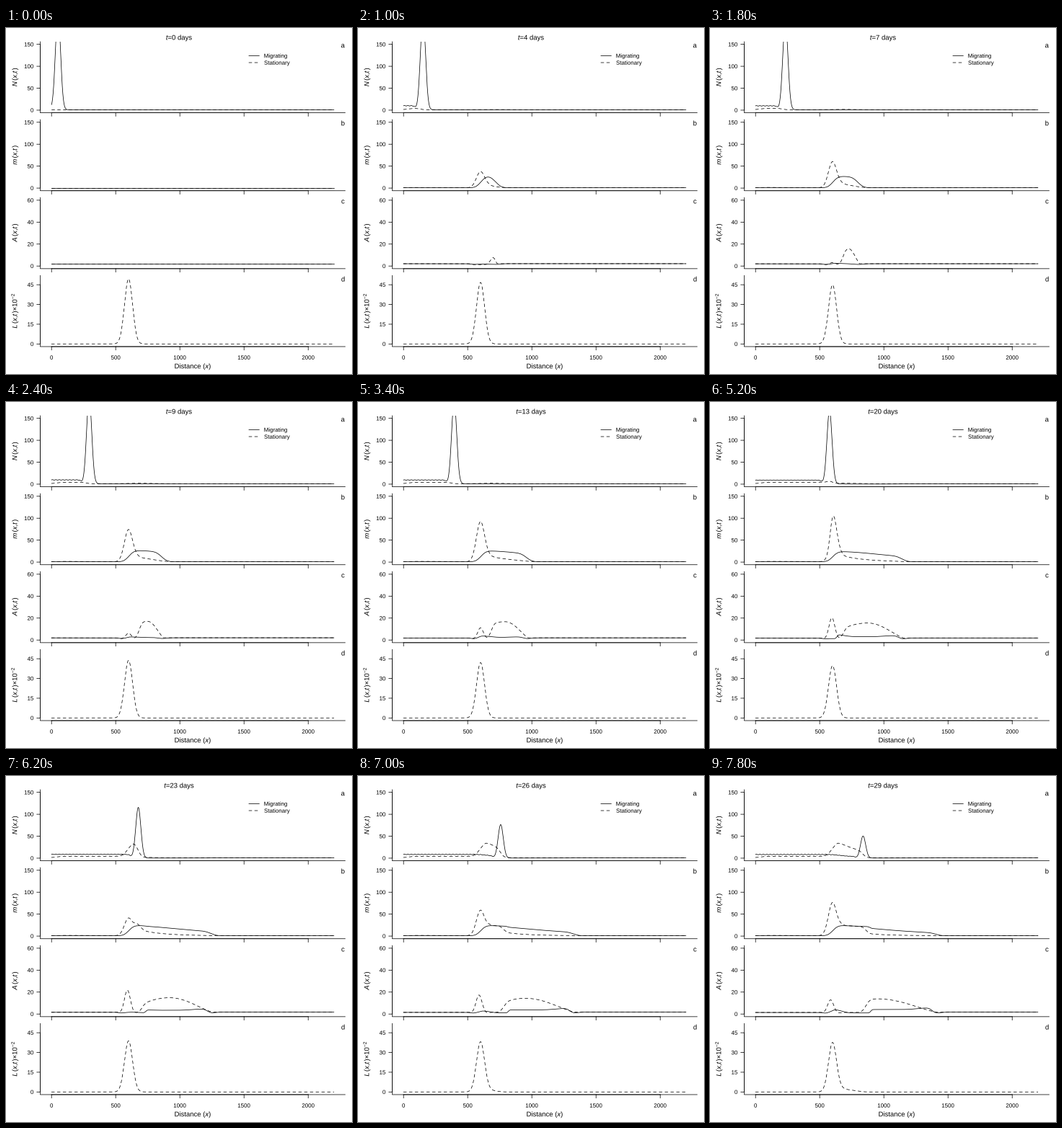
Write a matplotlib script that moves like this. It is 480x480 px and loops after 8000 ms.

```python
import math

import matplotlib.pyplot as plt
import numpy as np
from matplotlib.animation import FuncAnimation
from matplotlib.patches import PathPatch
from matplotlib.textpath import TextPath
from matplotlib.transforms import Affine2D, IdentityTransform

SIZE, DPI = 480, 72
FRAMES, INTERVAL = 40, 200
DAYS = 0.75        # days per frame
STEP = 20.25       # distance travelled per frame
SITE = 600         # centre of the infection source
ROW = 9.504        # height of one margin line
SMALL, LARGE = 7.92, 9.5
WIDTH = 0.75       # line width

plt.rcParams.update({
    "font.family": "Liberation Sans",
    "mathtext.fontset": "custom",
    "mathtext.rm": "Liberation Sans",
    "mathtext.it": "Liberation Sans:italic",
    "lines.scale_dashes": False,
})

x = np.linspace(0, 2200, 551)
erf = np.vectorize(math.erf)


def rise(c, w):
    """Smooth step up at c."""
    return 0.5 * (1 + erf((x - c) / (w * math.sqrt(2))))


def fall(c, w):
    return 1 - rise(c, w)


def bell(c, w):
    return np.exp(-0.5 * ((x - c) / w) ** 2)


def pulse_at(k):
    return 50 + STEP * k


def front_at(k):
    return 617 + STEP * k


SETTLE = np.exp(-0.0045 * 20 * np.logaddexp(0, (x - 605) / 20))


def hosts_moving(k):
    p = pulse_at(k)
    base = 1 - 0.7 * min(1, k / 20) * rise(640, 40) * fall(front_at(k), 40)
    trail = 9.3 - 0.05 * k + 0.55 * np.sin(2 * np.pi * x / 27)
    return base + SETTLE * ((222 - 2 * k) * bell(p, 20) + trail * fall(p - 60, 12))


def hosts_still(k):
    p = pulse_at(k)
    trail = (0.5 + 2.8 * rise(45, 28)) * fall(p - 25, 25) * min(1, k / 3)
    settled = 35.5 * rise(595, 35) * np.exp(-0.0046 * np.maximum(0, x - 640))
    early = 1.1 * bell(680, 80) * min(1, k / 12) * rise(p, 30)
    ahead = fall(560, 40) + rise(560, 40) * 0.3
    return 1 + trail * ahead + settled * fall(p, 22) + early


def load_moving(k):
    p = pulse_at(k)
    age = np.maximum(0, x - 640) / 526
    level = (27.5 - 0.17 * k) / (1 + age ** 2)
    fresh = 23.3 - 0.011 * (x - 660)
    behind = fall(p + 50, 12)
    level = level + (fresh - level) * behind * (k > 22)
    window = rise(603, 32) * fall(front_at(k), 35)
    return 0.8 + level * window * min(1, k / 3)


def load_still(k):
    p = pulse_at(k)
    peak = 145 * (1 - math.exp(-k / 17)) * (1 - 0.79 * fall(p, 22))
    peak = peak + 4.2 * max(0, (p - 607) / STEP)
    tail = (15 * (1 - math.exp(-k / 9)) * np.exp(-(x - 670) / 180)
            * fall(front_at(k), 60))
    fresh = 23.5 - 0.015 * (x - 670)
    behind = fall(p + 20, 22)
    tail = (tail + (fresh - tail) * behind) * rise(645, 20)
    trail = 0.8 * rise(50, 25) * fall(min(p - 20, 400), 40 + 3 * k) * min(1, k / 4)
    return 0.8 + peak * bell(SITE, 32) + tail + trail


def adults_moving(k):
    p, f = pulse_at(k), front_at(k)
    on = min(1, k / 5)
    base = 2.2 - 0.02 * k + 0.3 * k / FRAMES * rise(f, 60)
    side = np.where(x < 615, bell(615, 28), bell(615, 65))
    inner = on * (-1.4 + 0.105 * k) + 0.035 * k * bell(f - 75, 70) + 0.08 * k * side
    ahead = rise(p + 58, 9)
    inner = inner * ahead - 0.45 * (1 - ahead)
    window = rise(577, 15) * fall(f - 30, 20)
    dips = -0.6 * on * (bell(545, 20) + bell(f + 5, 30))
    regrown = 2.8 * max(0, (k - 29) / 10) * np.where(x < 620, bell(620, 28), bell(620, 50))
    return base + inner * window + dips + regrown


def adults_still(k):
    p, f = pulse_at(k), front_at(k)
    base = 2.2 - 0.02 * k + 0.35 * k / FRAMES * rise(f, 60)
    c = min(640 + 9 * k, 950)
    r = np.clip((x - c) / max(f + 12 - c, 1), 0, 1)
    right = np.maximum(0, np.cos(np.pi / 2 * r)) ** 1.3
    left = np.maximum(0, 1 - 0.22 * (np.maximum(0, c - x) / 150) ** 2)
    amp = (16.7 - 0.11 * k) * (1 - math.exp(-(k / 6) ** 2))
    hump = amp * right * left * rise(683, 19) * rise(p + 18, 25)
    peak = np.interp(k, [0, 7, 22, 28, 31, 39], [0, 0, 15.2, 21.5, 21, 12.3])
    spot = np.interp(k, [0, 20, 31, 39], [600, 600, 591, 585])
    dip = -0.8 * min(1, k / 4) * rise(530, 12) * fall(660, 12)
    return base + hump + peak * bell(spot, 20 + 0.1 * k) + dip


def larvae(k):
    peak = 49.5 - 15 * (1 - math.exp(-k / 25))
    tail = (2.5 * np.clip((k - 27) / 12, 0, 1) * rise(650, 20)
            * np.exp(-(x - 670) / 160) * fall(pulse_at(k) - 30, 40))
    return peak * bell(SITE, 31.5) + tail


fig = plt.figure(figsize=(SIZE / DPI, SIZE / DPI), dpi=DPI, facecolor="white")


def outline(px, py, text, size=LARGE, align=0.5, turn=0):
    """Text as a path, its baseline at pixel (px, py) from the top left."""
    path = TextPath((0, 0), text, size=size)
    box = path.get_extents()
    shift = -(box.x0 + align * box.width)
    place = Affine2D().translate(shift, 0).rotate_deg(turn).translate(px, SIZE - py)
    return place.transform_path(path)


def put(*args, **kw):
    patch = PathPatch(outline(*args, **kw), color="black", lw=0,
                      transform=IdentityTransform())
    return fig.add_artist(patch)


def solid(ax, *data, **kw):
    return ax.plot(*data, color="black", lw=WIDTH, **kw)[0]


def dashed(ax, *data, **kw):
    return solid(ax, *data, ls=(0, (4, 4)), dash_capstyle="round", **kw)


def rule(xs, ys):
    """Unsnapped line in pixels from the top left."""
    solid(page, xs, [SIZE - y for y in ys], transform=None, snap=False)


page = fig.add_axes([0, 0, 1, 1])
page.axis("off")

LEFT, RIGHT = 5 * ROW, SIZE - ROW
PITCH = (SIZE - 5 * ROW) / 4
XTICKS = range(0, 2001, 500)

# letter, label, upper limit, tick step, solid curve, dashed curve
PANELS = [
    ("a", r"$N\,$($x$,$t\,$)", 150, 50, hosts_moving, hosts_still),
    ("b", r"$m\,$($x$,$t\,$)", 150, 50, load_moving, load_still),
    ("c", r"$A\,$($x$,$t\,$)", 60, 20, adults_moving, adults_still),
    ("d", r"$L\,$($x$,$t\,$)×10$^{-2}$", 50, 15, None, larvae),
]


def px_x(v):
    return LEFT + (v + 88) / 2376 * (RIGHT - LEFT)


curves = []
for i, (letter, label, top, tick, moving, still) in enumerate(PANELS):
    head = 2 * ROW + PITCH * i
    foot = head + PITCH - ROW
    ax = fig.add_axes([LEFT / SIZE, 1 - foot / SIZE,
                       (RIGHT - LEFT) / SIZE, (foot - head) / SIZE])
    ax.axis("off")
    ax.set_xlim(-88, 2288)
    ax.set_ylim(-0.04 * top, 1.04 * top)

    def px_y(v):
        return foot - (v / top + 0.04) / 1.08 * (foot - head)

    # frame, then the axes drawn over it
    yticks = range(0, top + 1, tick)
    rule([LEFT, LEFT, RIGHT], [head, foot, foot])
    rule([px_x(0), px_x(XTICKS[-1])], [foot, foot])
    rule([LEFT, LEFT], [px_y(0), px_y(yticks[-1])])
    for v in XTICKS:
        rule([px_x(v)] * 2, [foot, foot + ROW / 2])
    for v in yticks:
        rule([LEFT - ROW / 2, LEFT], [px_y(v)] * 2)
        put(38, px_y(v) + 2.8, str(v), size=SMALL, align=1)

    put(15.3, (head + foot) / 2, label, turn=90)
    put(467.5, head + 8.2, letter)
    if moving:
        curves.append((solid(ax, [], []), moving))
    curves.append((dashed(ax, [], []), still))

for v in XTICKS:
    put(px_x(v), 459.8, str(v), size=SMALL)
put((LEFT + RIGHT) / 2, 472.3, "Distance ($x$)")

for py, name, draw in [(38.4, "Migrating", solid), (48, "Stationary", dashed)]:
    draw(page, [337, 351.3], [SIZE - py] * 2, transform=None, snap=False)
    put(358.4, py + 2.8, name, size=SMALL, align=0)


def heading(k):
    return outline(SIZE / 2, 16.4, f"$t$={round(k * DAYS)} days")


title = put(SIZE / 2, 16.4, "$t$=0 days")


def update(k):
    title.set_path(heading(k))
    for line, curve in curves:
        line.set_data(x, curve(k))
    return [title] + [line for line, _ in curves]


anim = FuncAnimation(fig, update, frames=FRAMES, interval=INTERVAL,
                     repeat=True, repeat_delay=0, blit=False)
plt.show()
```
